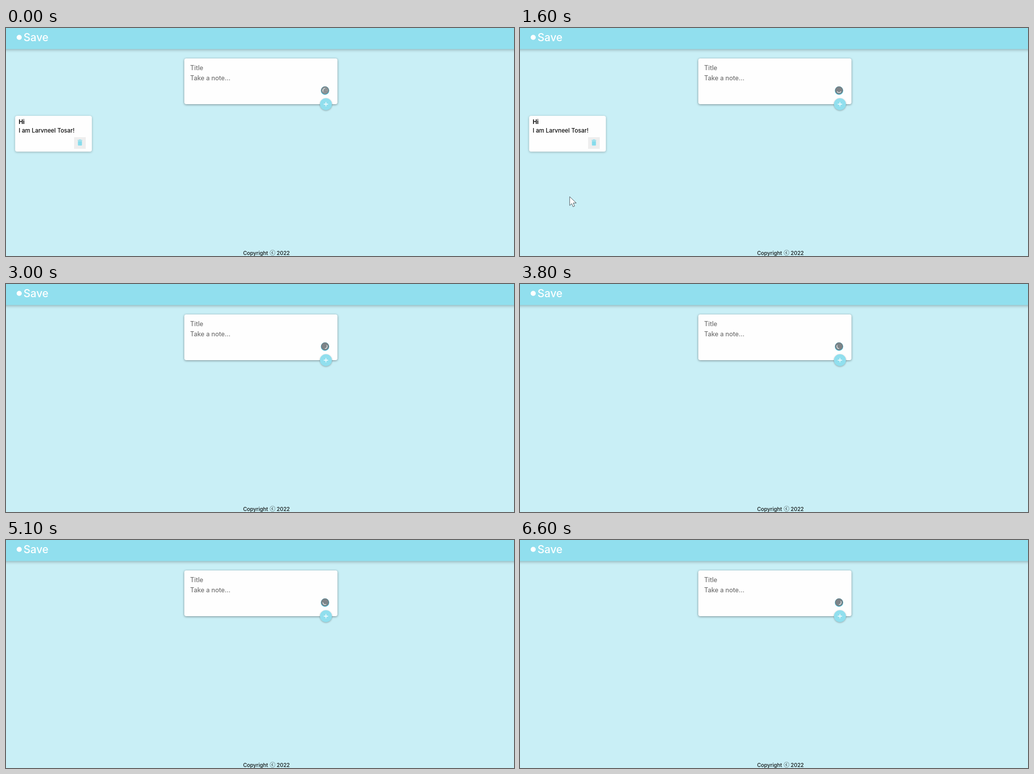
Write an HTML page that moves like this. It is 1000x449 px and loops after 6.7 s.

```html
<!DOCTYPE html>
<html lang="en">
<head>
<meta charset="utf-8">
<title>Notes</title>
<style>
  html, body { margin: 0; width: 100%; height: 100%; overflow: hidden; background: #c9eff6; }
  svg { display: block; width: 100%; height: 100%; }
  text { font-family: Inter, "Open Sans", sans-serif; font-weight: 500; }
  .brand { font-size: 21px; fill: #fff; }
  .field { font-size: 12.4px; fill: #737373; }
  .note { font-size: 11.4px; fill: #0a0a0a; }
  .note .head { font-weight: 700; }
  .footer { font-size: 10.4px; fill: #101414; }
  .footer .mark { font-family: "Noto Sans CJK JP", "Noto Sans CJK", sans-serif; font-size: 11px; }
  .bar { filter: drop-shadow(0 1px 3px rgba(0, 0, 0, .32)); }
  .panel { filter: drop-shadow(0 1px 2px rgba(0, 0, 0, .42)); }
  .paper { filter: drop-shadow(0 1px 2px rgba(0, 0, 0, .28)); }
  .round { filter: drop-shadow(0 1px 1.5px rgba(0, 0, 0, .3)); }
</style>
</head>
<body>
<svg viewBox="0 0 1000 449" preserveAspectRatio="none">
  <rect width="1000" height="449" fill="#c9eff6"/>
  <rect class="bar" x="-10" y="-10" width="1020" height="51.5" fill="#91dfee"/>
  <circle cx="26" cy="18.5" r="5" fill="#fff"/>
  <text class="brand" x="34.5" y="25.8">Save</text>

  <rect class="panel" x="351" y="60" width="301.5" height="90" rx="4" fill="#fefefe"/>
  <g class="field">
    <text x="362.5" y="83.2">Title</text>
    <text x="362.5" y="103.2">Take a note...</text>
  </g>

  <g transform="translate(628 123)">
    <circle cy=".4" r="8.3" fill="#68cee6"/>
    <circle cy="-.2" r="7.5" fill="#7e8488"/>
    <circle cy="-.2" r="7.2" fill="none" stroke="#405f6b" stroke-width="1" stroke-dasharray="1 1"/>
    <path id="arc" d="M2.3-3.5A4.2 4.2 0 0 1 2.3 3.5" fill="none" stroke="#e4f0f2" stroke-width="1.3" stroke-linecap="round"/>
    <g id="dots" fill="none" stroke="#d8dcd8" stroke-width="1" stroke-dasharray="1 1.3">
      <circle r="1.5"/>
      <circle r="3.6"/>
      <circle r="5.7"/>
    </g>
  </g>

  <circle class="round" cx="629.8" cy="150" r="11.8" fill="#91dfee"/>
  <path d="M625.5 150h8.6M629.8 145.7v8.6" stroke="#fff" stroke-width="1.3"/>

  <g id="card" class="note">
    <rect class="paper" x="18" y="173" width="151" height="70.5" rx="4" fill="#fefefe"/>
    <text class="head" x="25" y="189.4">Hi</text>
    <text x="25" y="206.2">I am Larvneel Tosar!</text>
    <rect x="134" y="215" width="23" height="23" fill="#eee"/>
    <path d="M141 220.4h2.4l.7-.8h3l.7.8h2.3v1.3H141zM141.6 222.4h7.9v7.9q0 1.2-1.2 1.2h-5.5q-1.2 0-1.2-1.2z" fill="#86dcec"/>
  </g>

  <g class="footer">
    <text x="466.7" y="446.8">Copyright</text>
    <text class="mark" x="519.2" y="446.8">ⓒ</text>
    <text x="532.8" y="446.8">2022</text>
  </g>

  <path id="pointer" d="M97.8 332.2v17.3l4-3.7 2.7 6.2 3-1.3-2.7-6h6z" fill="#fff" stroke="#39454a" stroke-width=".9" stroke-linejoin="round"/>
</svg>
<script>
  const LOOP = 6700, STEP = 100, DEGREES_PER_STEP = -30, START_ANGLE = 210;
  // Times in ms during which each part is visible.
  const VISIBLE = {
    card: [0, 2900],
    pointer: [1600, 1800],
    dots: [0, 100]
  };
  const part = id => document.getElementById(id);

  function draw(now) {
    const time = Math.floor((now % LOOP) / STEP) * STEP;
    for (const [id, [from, to]] of Object.entries(VISIBLE)) {
      part(id).style.display = time >= from && time < to ? "" : "none";
    }
    const angle = START_ANGLE + time / STEP * DEGREES_PER_STEP;
    part("arc").setAttribute("transform", `rotate(${angle})`);
  }

  const start = performance.now();
  function tick() {
    draw(performance.now() - start);
    requestAnimationFrame(tick);
  }
  tick();
</script>
</body>
</html>
```
